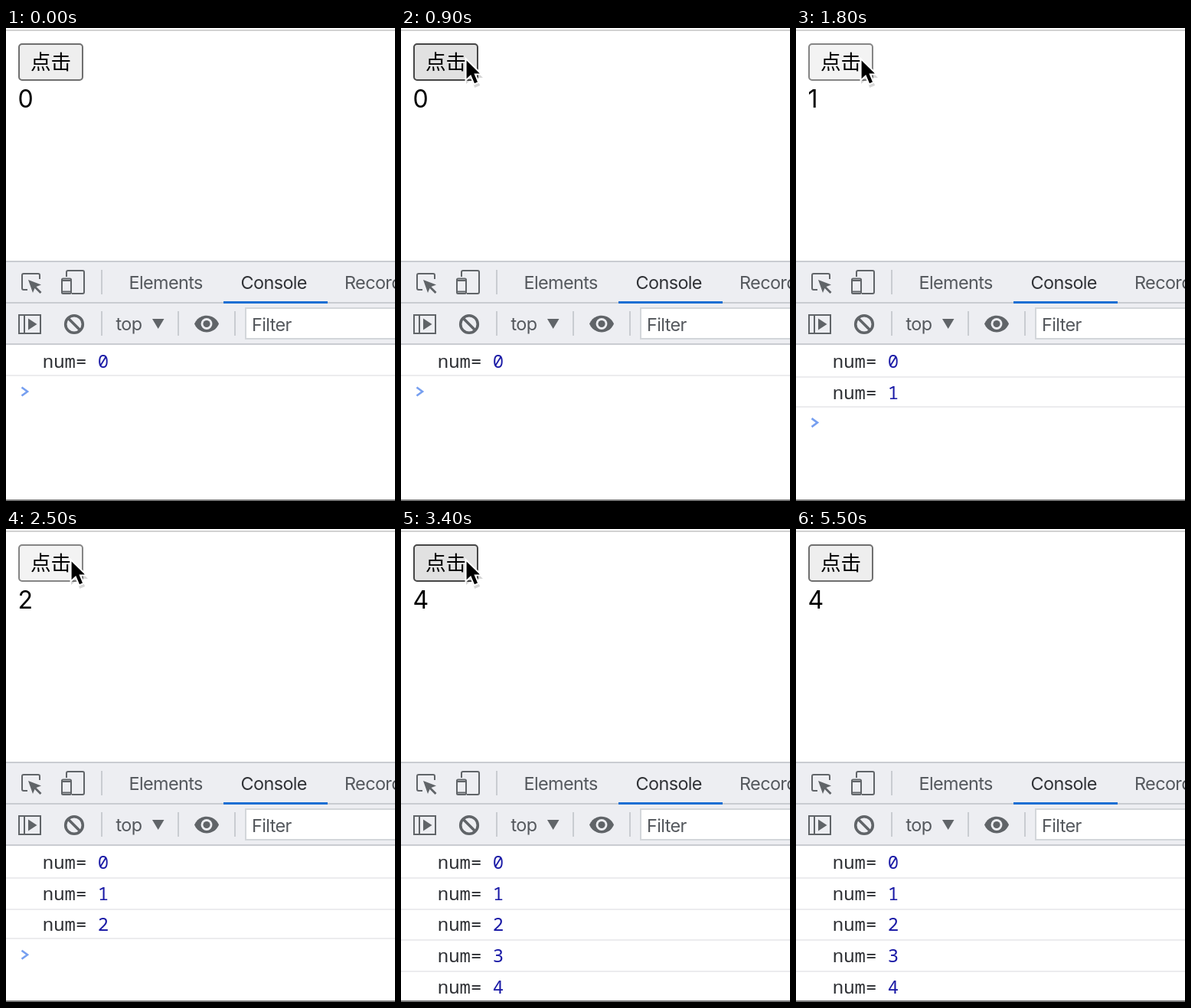
These frames come from a looping animation (508x618 px, 5.6 s). An HTML page:

```html
<!DOCTYPE html>
<html lang="zh">
<head>
<meta charset="utf-8">
<title>Click counter</title>
<style>
  html, body { margin: 0; width: 100%; height: 100%; overflow: hidden; background: #fff; }
  svg { display: block; width: 100vw; height: 100vh; }
  text { white-space: pre; }
  .ui { font: 23.4px Inter, Roboto, sans-serif; letter-spacing: -.6px; fill: #54585d; }
  .num { font: 32px Inter, Roboto, sans-serif; fill: #000; }
  .cjk { font: 26.6px "Noto Sans CJK SC", "Noto Sans CJK", sans-serif; fill: #000; }
  .log { font: 24px "Noto Sans Mono", "DejaVu Sans Mono", monospace; fill: #303236; }
  .val { fill: #1a1aa6; }
  .line { stroke: #c9ccd1; stroke-width: 2; }
  .icon { fill: none; stroke: #606468; stroke-width: 2; }
  .solid { fill: #606468; }
</style>
</head>
<body>
<svg viewBox="0 0 508 618" preserveAspectRatio="none">
  <rect width="508" height="618" fill="#fff"/>
  <path d="M0 3H508" stroke="#d2d2d2" stroke-width="2"/>

  <rect id="button" x="17" y="21" width="83" height="47" rx="4" stroke-width="2"/>
  <text class="cjk" x="32" y="54">点击</text>
  <text class="num" id="count" x="15.5" y="103.5"></text>

  <rect y="305" width="508" height="108" fill="#edeef2"/>
  <path class="line" d="M0 305H508M0 359H508M0 413H508M125 316V348M125 370V402M225 370V402M299 370V402"/>
  <rect x="284" y="357" width="136" height="3" fill="#1b6fd3"/>

  <path class="icon" d="M28 342H23Q21 342 21 340V323Q21 321 23 321H42Q44 321 44 323V328"/>
  <path class="solid" d="M29 329L46 335.5L39.5 338L46.5 345L44.5 347L37.5 340L35 346Z"/>
  <path class="icon" d="M79 325V319Q79 317 81 317H100Q102 317 102 319V345Q102 347 100 347H86"/>
  <rect class="icon" x="73" y="327.5" width="12" height="19.5" rx="1.5" stroke-width="2.4"/>
  <path class="icon" d="M73 330H85M73 344.5H85"/>
  <text class="ui" x="160.5" y="341">Elements</text>
  <text class="ui" x="306.5" y="341" style="fill:#303236">Console</text>
  <text class="ui" x="442" y="341">Recorder</text>

  <path class="icon" d="M17 375H45V399H17ZM24 375V399"/>
  <path class="solid" d="M29 379.5L40.5 387L29 394.5Z"/>
  <g class="icon" style="stroke-width:3.6"><circle cx="89" cy="387" r="11.3"/><path d="M81 379L97 395"/></g>
  <text class="ui" x="143.5" y="395">top</text>
  <path class="solid" d="M191 380H206.5L198.7 393Z"/>
  <path class="solid" d="M246 386.5C252 372 272 372 278 386.5C272 401 252 401 246 386.5Z"/>
  <circle cx="262" cy="386.5" r="7.4" fill="#edeef2"/>
  <circle class="solid" cx="262" cy="386.5" r="4.6"/>
  <rect x="313" y="366" width="210" height="40" fill="#fff" stroke="#d3d6da" stroke-width="2"/>
  <text class="ui" x="321" y="396">Filter</text>

  <g id="rows"></g>
  <path id="prompt" d="M20.5 469.5L28 475L20.5 480.5" fill="none" stroke="#769ff0" stroke-width="2.6"/>
  <path d="M0 617H508" stroke="#777" stroke-width="2"/>

  <g id="cursor">
    <path d="M0 0V30L6.7 24.2L11.3 35L18.2 32L13.8 22H22Z" transform="translate(1 3)" fill="#000" opacity=".16"/>
    <path d="M1.6 2.6V26.2L7.2 21L12 32.2L16 30.4L11.4 19.4H18.8Z" fill="#000" stroke="#fff" stroke-width="4" paint-order="stroke"/>
  </g>
</svg>
<script>
  const LOOP = 5600, STEP = 100, PITCH = 40.7;
  const REST = [84, 40], ENTRY = [241, 219], EXIT = [281, 565];
  const PRESSES = [1100, 1800, 2500, 3100];
  const el = id => document.getElementById(id);
  const button = el("button"), count = el("count"), rows = el("rows"),
        prompt = el("prompt"), cursor = el("cursor");
  const looks = {
    idle: ["#eeeeee", "#6f6f6f"],
    hover: ["#e1e1e1", "#464646"],
    active: ["#f3f3f3", "#858585"]
  };

  const mix = (a, b, k) => a.map((v, i) => v + (b[i] - v) * k);

  // Pointer tip at time t, or null while it is off the stage.
  function pointer(t) {
    if (t < 400 || t >= 4400) return null;
    if (t < 900) return mix(ENTRY, REST, 1 - (1 - (t - 400) / 500) ** 2);
    if (t < 4100) return REST;
    return mix(REST, EXIT, ((t - 4000) / 300) ** 2);
  }

  const onButton = p => p && p[0] >= 16 && p[0] <= 101 && p[1] >= 20 && p[1] <= 69;

  function logRow(i, last) {
    const y = 444 + PITCH * i, rule = last ? 454 + 40.6 * i : 456 + PITCH * i;
    return `<text class="log" x="47.8" y="${y}">num= <tspan class="val">${i}</tspan></text>` +
           `<path d="M0 ${Math.round(rule)}H508" stroke="#ececee" stroke-width="2"/>`;
  }

  let shown = -1;
  function draw(time) {
    const t = Math.floor((time % LOOP) / STEP) * STEP;
    const p = pointer(t);
    const pressed = PRESSES.some(s => t >= s && t < s + STEP);
    const n = PRESSES.filter(s => t >= s + STEP).length;

    const [fill, stroke] = looks[pressed ? "active" : onButton(p) ? "hover" : "idle"];
    button.setAttribute("fill", fill);
    button.setAttribute("stroke", stroke);

    if (n !== shown) {
      shown = n;
      count.textContent = n;
      rows.innerHTML = Array.from({ length: n + 1 }, (_, i) => logRow(i, i === n)).join("");
      prompt.setAttribute("transform", `translate(0 ${40.6 * n})`);
      prompt.setAttribute("visibility", n < 4 ? "visible" : "hidden");
    }

    cursor.setAttribute("visibility", p ? "visible" : "hidden");
    if (p) cursor.setAttribute("transform", `translate(${p[0]} ${p[1]})`);
  }

  const start = performance.now();
  function frame() {
    draw(performance.now() - start);
    requestAnimationFrame(frame);
  }
  frame();
</script>
</body>
</html>
```
